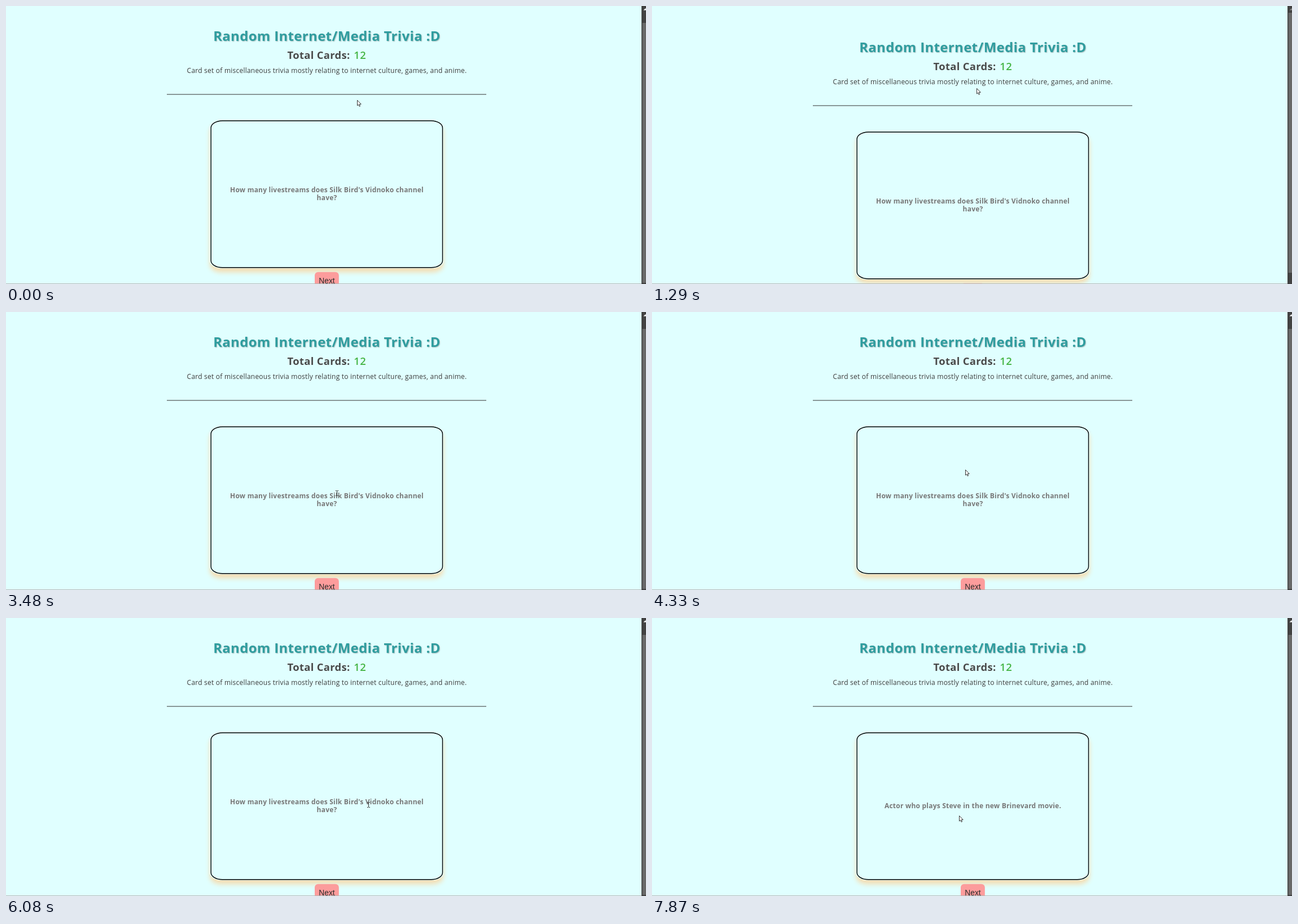
An HTML page with a canvas that plays this animation: 1134 px wide and 494 px high, repeating every 7.99 s.

```html
<!DOCTYPE html>
<html lang="en">
<head>
<meta charset="utf-8">
<title>Trivia cards</title>
<style>
html, body { margin: 0; width: 100%; height: 100%; overflow: hidden; background: #e0ffff; }
canvas { display: block; width: 1134px; height: 494px; }
</style>
</head>
<body>
<canvas id="stage" width="1134" height="494"></canvas>
<script>
const ctx = document.getElementById('stage').getContext('2d');
const W = 1134, H = 494, MID = 568.5, LOOP = 7990;
const SANS = '"Open Sans", "Noto Sans", sans-serif';
const TRACKING = 0.018;

// Each list holds [start time, value...] and the latest started entry applies.
const scrolls = [[0, 0], [1160, 12], [1290, 20], [1850, 0]];

const question = ["How many livestreams does Silk Bird's Vidnoko channel", 'have?'];
const cards = [
  [0, question],
  [4880, ['8 streams']],
  [6080, question],
  [7260, ['Actor who plays Steve in the new Brinevard movie.']]
];

const pointer = [
  [0, 622, 167, arrow], [550, 579, 148, arrow], [700, 575, 146, arrow],
  [2700, 556, 240, arrow], [2830, 535, 337, arrow],
  [2980, 483.5, 320, beam], [3100, 512.5, 321, beam], [3220, 553.5, 322, beam],
  [3360, 573.5, 322, beam], [3480, 586.5, 322, beam], [3760, 606.5, 333, beam],
  [3910, 620, 341, arrow], [4060, 605, 339, arrow], [4210, 585, 315, arrow],
  [4330, 555, 280, arrow], [4450, 541, 265, arrow],
  [5130, 571, 303, arrow], [5250, 593.5, 334, beam], [5400, 593.5, 335, beam],
  [5690, 641, 331, arrow], [6080, 642.5, 332, beam],
  [6340, 618, 390, arrow], [6460, 582, 452, arrow],
  [6610, 581, 461, arrow], [6730, 579, 474, hand], [6850, 576, 479, hand],
  [6970, 575, 481, hand], [7380, 577, 450, arrow], [7500, 582, 390, arrow],
  [7620, 585, 356, arrow], [7870, 544, 351, arrow]
];

function at(list, t) {
  let hit = list[0];
  for (const item of list) if (item[0] <= t) hit = item;
  return hit;
}

function poly(points, fill, stroke) {
  ctx.beginPath();
  for (let i = 0; i < points.length; i += 2) ctx.lineTo(points[i], points[i + 1]);
  ctx.closePath();
  ctx.fillStyle = fill;
  ctx.fill();
  if (!stroke) return;
  ctx.strokeStyle = stroke;
  ctx.lineWidth = 0.9;
  ctx.stroke();
}

function rect(x, y, w, h, color) {
  ctx.fillStyle = color;
  ctx.fillRect(x, y, w, h);
}

function text(str, x, y, size, weight, color, align = 'center') {
  ctx.font = `${weight} ${size}px ${SANS}`;
  ctx.letterSpacing = `${size * TRACKING}px`;
  ctx.fillStyle = color;
  ctx.textAlign = align;
  ctx.fillText(str, x, y);
}

function arrow() {
  poly([0.5, 0.5, 0.5, 10, 2.6, 8.1, 4.1, 11.5, 5.6, 10.8, 4.2, 7.6, 7.2, 7.4], '#fff', '#222');
}

function beam() {
  rect(-0.5, -4, 1, 8, '#333');
  for (const y of [-5, 4]) {
    rect(-2.5, y, 2, 1, '#333');
    rect(0.5, y, 2, 1, '#333');
  }
}

function hand() {
  poly([-1, 0, 0.7, 0, 1, 4, 6, 5.2, 6.6, 6.5, 6, 10, 4.8, 12.5, -0.6, 12.5, -3.6, 8, -3.2, 6.8, -1, 8],
    '#fff', '#222');
}

function roundBox(x, y, w, h, rx, ry) {
  const q = Math.PI / 2;
  ctx.beginPath();
  ctx.ellipse(x + rx, y + ry, rx, ry, 0, 2 * q, 3 * q);
  ctx.ellipse(x + w - rx, y + ry, rx, ry, 0, 3 * q, 4 * q);
  ctx.ellipse(x + w - rx, y + h - ry, rx, ry, 0, 0, q);
  ctx.ellipse(x + rx, y + h - ry, rx, ry, 0, q, 2 * q);
  ctx.closePath();
}

function header() {
  ctx.save();
  ctx.shadowColor = 'rgba(110, 120, 120, 0.5)';
  ctx.shadowOffsetX = ctx.shadowOffsetY = 1;
  ctx.shadowBlur = 1.5;
  text('Random Internet/Media Trivia :D', MID, 62, 23.8, 'bold', '#2f9d9f');
  ctx.restore();

  text('Total Cards: ', 498.5, 94, 18.4, 'bold', '#4a4a4a', 'left');
  text('12', 638, 94, 18.4, 600, '#45b545', 'right');
  text('Card set of miscellaneous trivia mostly relating to internet culture, games, and anime.',
    MID, 119, 12.03, 'normal', '#3c3c3c');
  rect(285, 156.5, 566, 1.1, '#444');
}

function card(lines) {
  ctx.save();
  ctx.shadowColor = '#f5deb3';
  ctx.shadowOffsetY = 7;
  ctx.shadowBlur = 8;
  roundBox(361.5, 203.3, 413.5, 263, 20.5, 13);
  ctx.fillStyle = '#e0ffff';
  ctx.fill();
  ctx.restore();
  roundBox(363.2, 204, 410.3, 260.8, 20, 12.6);
  ctx.strokeStyle = '#000';
  ctx.lineWidth = 1.4;
  ctx.stroke();

  const top = 338 - (lines.length - 1) * 7;
  lines.forEach((line, i) => text(line, MID, top + i * 14, 12, 'bold', '#777'));
}

function nextButton() {
  roundBox(547, 472.7, 42.8, 28, 6, 6);
  ctx.fillStyle = '#fc9c9c';
  ctx.fill();
  ctx.font = '13.8px "Liberation Sans", sans-serif';
  ctx.letterSpacing = '0px';
  ctx.textAlign = 'center';
  ctx.fillStyle = '#2c2c2c';
  ctx.fillText('Next', MID, 493);
}

function scrollbar(scroll) {
  rect(1126, 0, 8, H, '#424242');
  rect(1127.5, 30 - scroll * 0.9, 6.5, 462, '#686868');
  poly([1129.5, 7.5, 1134, 7.5, 1134, 4.5, 1132.5, 4.5], scroll < 20 ? '#fff' : '#858585');
}

function draw(t) {
  const scroll = at(scrolls, t)[1];
  rect(0, 0, W, H, '#e0ffff');
  ctx.save();
  ctx.translate(0, scroll);
  header();
  card(at(cards, t)[1]);
  nextButton();
  ctx.restore();
  rect(0, 493, W, 1, '#b5b9b9');
  scrollbar(scroll);

  const [, x, y, shape] = at(pointer, t);
  ctx.save();
  ctx.translate(x, y);
  shape();
  ctx.restore();
}

const start = performance.now();
function tick() {
  draw((performance.now() - start) % LOOP);
  requestAnimationFrame(tick);
}
tick();
</script>
</body>
</html>
```
